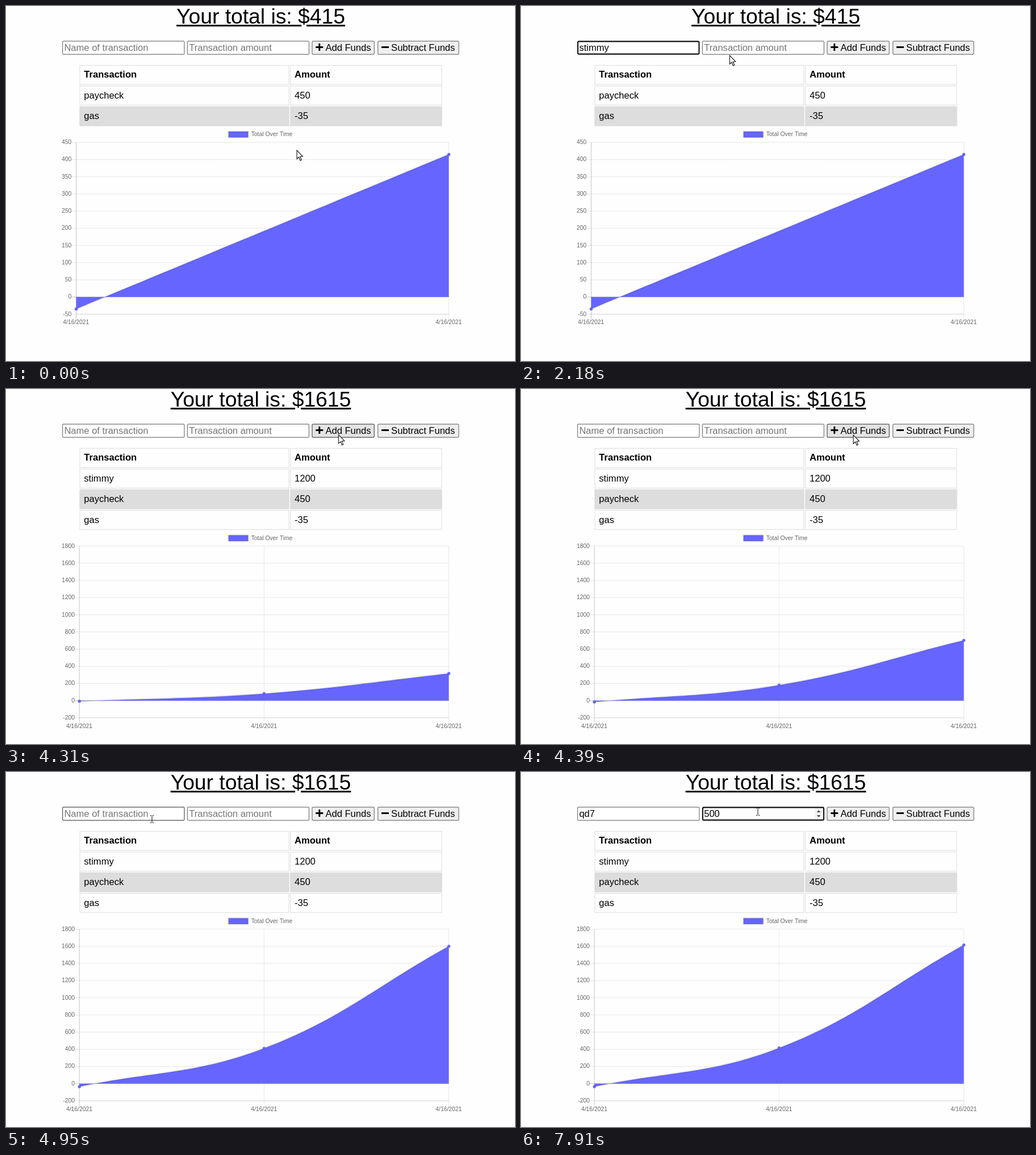
An HTML page with a canvas that plays this animation: 896x625 px, repeating every 8000 ms.

```html
<!DOCTYPE html>
<html lang="en">
<head>
<meta charset="utf-8">
<title>Budget tracker</title>
<style>
  html, body { margin: 0; width: 100%; height: 100%; overflow: hidden; background: #fefefe; }
  canvas { position: absolute; left: 0; top: 0; }
  h1 {
    position: absolute; left: 0; top: -3px; width: 897px; margin: 0;
    font: 37.26px/42px "Liberation Sans", Arial, sans-serif;
    text-align: center; text-decoration: underline; white-space: nowrap; color: #000;
  }
</style>
</head>
<body>
<h1 id="total">Your total is: $415</h1>
<canvas id="stage" width="896" height="625"></canvas>
<script>
const LOOP = 8000;
const ADDED = 4240, GROW_START = 4258, GROW = 1000;
const FAMILY = '"Liberation Sans", Arial, sans-serif';
const BODY = '16.56px ' + FAMILY;
const SMALL = '10.35px ' + FAMILY;
const BLUE = '#6666ff';
const ctx = document.getElementById('stage').getContext('2d');
const title = document.getElementById('total');

const NAME = { x: 99, w: 215.5, hint: 'Name of transaction' };
const AMOUNT = { x: 318.8, w: 215.2, hint: 'Transaction amount', number: true };
const ADD = { x: 538.3, w: 110.5, label: 'Add Funds', plus: true };
const SUBTRACT = { x: 654, w: 143.6, label: 'Subtract Funds' };

// Which field has the focus from each time on
const focusSteps = [[0, null], [920, NAME], [2390, AMOUNT], [ADDED, null], [5330, NAME], [6900, AMOUNT]];
// Times at which the text caret turns on, off, on ...
const caretFlips = [950, 1180, 1240, 1940, 2190, 2640, 2860, 3320, 3570, 3820, 4070, ADDED,
  5340, 5600, 5830, 6410, 6610, 7150, 7390, 7910];
const entries = [
  { field: NAME, text: 'stimmy', from: 1240, to: 1690, clear: ADDED },
  { field: AMOUNT, text: '1200', from: 2860, to: 3070, clear: ADDED },
  { field: NAME, text: 'qd7', from: 6090, to: 6170, clear: LOOP },
  { field: AMOUNT, text: '500', from: 7450, to: 7630, clear: LOOP }
];
// Pointer path: time, x, y
const path = [
  [0, 512, 254], [100, 512, 254], [400, 390, 150], [640, 285, 50], [710, 262, 44], [820, 240, 64],
  [1940, 240, 64], [2180, 367, 87], [2380, 400, 74], [2500, 405, 73],
  [3320, 405, 73], [3580, 545, 22], [3800, 606, 60], [3960, 602, 71], [4120, 592, 75],
  [4200, 592, 75], [4330, 585, 81], [4430, 585, 81], [4700, 400, 92], [4950, 257, 83],
  [5050, 257, 83], [5140, 246, 76], [6410, 246, 76], [6620, 453, 73], [6800, 440, 72],
  [6980, 417, 70], [LOOP, 417, 70]
];

function slope(i, k) {
  const a = path[i - 1], b = path[i], c = path[i + 1];
  if (!a || !c) return 0;
  const before = b[k] - a[k], after = c[k] - b[k];
  return before * after <= 0 ? 0 : (before + after) / (c[0] - a[0]);
}

function pointerAt(t) {
  let i = 0;
  while (i < path.length - 2 && path[i + 1][0] <= t) i++;
  const a = path[i], b = path[i + 1], d = b[0] - a[0], u = (t - a[0]) / d;
  const still = a[1] === b[1] && a[2] === b[2];
  const axis = k => {
    if (still) return a[k];
    const s = u * u * (3 - 2 * u);
    return a[k] + (b[k] - a[k]) * s +
      d * (slope(i, k) * u * (1 - u) * (1 - u) - slope(i + 1, k) * u * u * (1 - u));
  };
  return { x: axis(1), y: axis(2) };
}

function write(str, x, y, color = '#000', font = BODY, align = 'left') {
  ctx.font = font;
  ctx.fillStyle = color;
  ctx.textAlign = align;
  ctx.fillText(str, x, y);
}

function line(x1, y1, x2, y2, color, width = 0.9) {
  ctx.strokeStyle = color;
  ctx.lineWidth = width;
  ctx.beginPath();
  ctx.moveTo(x1, y1);
  ctx.lineTo(x2, y2);
  ctx.stroke();
}

function polygon(points, color) {
  ctx.fillStyle = color;
  ctx.beginPath();
  points.forEach(p => ctx.lineTo(p[0], p[1]));
  ctx.closePath();
  ctx.fill();
}

function frame(box, fill, border, width, radius) {
  const h = width / 2;
  ctx.beginPath();
  ctx.roundRect(box.x + h, 61.3 + h, box.w - width, 24.4 - width, radius);
  ctx.fillStyle = fill;
  ctx.fill();
  ctx.strokeStyle = border;
  ctx.lineWidth = width;
  ctx.stroke();
}

const over = (box, p) => p.x >= box.x && p.x <= box.x + box.w && p.y >= 61 && p.y <= 86;

function typed(field, t) {
  const e = entries.find(e => e.field === field && t >= e.from && t < e.clear);
  if (!e) return '';
  const step = (e.to - e.from) / (e.text.length - 1);
  return e.text.slice(0, Math.floor((t - e.from) / step + 1.001));
}

function drawField(field, t, pointer) {
  const focused = focusSteps.filter(s => s[0] <= t).pop()[1] === field;
  const hover = over(field, pointer);
  if (focused) frame(field, '#fff', '#101010', 2.1, 2);
  else frame(field, '#fff', hover ? '#4f4f4f' : '#767676', 1.2, 1.5);

  const text = typed(field, t), x = field.x + 3.4;
  if (text) write(text, x, 79);
  else write(field.hint, x, 79, '#757575');

  if (focused && caretFlips.filter(f => f <= t).length % 2) {
    ctx.font = BODY;
    const cx = Math.round(x + (text ? ctx.measureText(text).width : 0));
    ctx.fillStyle = '#000';
    ctx.fillRect(cx, 65, 1, 17.5);
  }
  if (field.number && (focused || hover)) {
    ctx.fillStyle = '#f1f1f1';
    ctx.fillRect(517.5, 64, 13, 19);
    polygon([[520.8, 71], [524, 67.3], [527.2, 71]], '#484848');
    polygon([[520.8, 76], [524, 79.7], [527.2, 76]], '#484848');
  }
}

function drawButton(b, pointer) {
  const hover = over(b, pointer);
  frame(b, hover ? '#e4e4e4' : '#efefef', hover ? '#4f4f4f' : '#767676', 1.2, 2);
  const x = b.x + 6.8;
  ctx.fillStyle = '#000';
  ctx.beginPath();
  ctx.roundRect(x, 71.1, 13.2, 2.9, 0.8);
  if (b.plus) ctx.roundRect(x + 5.2, 66, 2.9, 13.1, 0.8);
  ctx.fill();
  write(b.label, b.x + 24.1, 79);
}

function drawTable(rows) {
  rows.forEach((row, i) => {
    const y = 104 + i * 36.4;
    [[129.5, 369], [500.2, 267.3]].forEach(([x, w], k) => {
      if (i && i % 2 === 0) {
        ctx.fillStyle = '#dddddd';
        ctx.fillRect(x, y, w, 34.6);
      }
      ctx.strokeStyle = '#dddddd';
      ctx.lineWidth = 1;
      ctx.strokeRect(x + 0.5, y + 0.5, w - 1, 33.6);
      write(row[k], x + 7.8, Math.round(y + 22.4), '#000', i ? BODY : 'bold ' + BODY);
    });
  });
}

function drawChart(c, grow) {
  const right = 779.5, gap = 30.23, ticks = 10, bottom = c.top + ticks * gap;
  const yOf = v => c.top + (c.max - v) / c.step * gap;
  const zero = yOf(0), last = c.values.length - 1;
  const xOf = i => c.left + (right - c.left) * i / last;
  const faint = 'rgba(0,0,0,0.1)', strong = 'rgba(0,0,0,0.25)';

  // Legend
  const ly = c.top - 19.2;
  ctx.fillStyle = BLUE;
  ctx.fillRect(391.7, ly, 34.6, 10.4);
  ctx.strokeStyle = faint;
  ctx.lineWidth = 2.6;
  ctx.strokeRect(391.7, ly, 34.6, 10.4);
  write('Total Over Time', 431.7, c.top - 11, '#666', SMALL);

  // Grid and labels
  for (let i = 0; i <= last; i++) {
    const x = xOf(i);
    line(x, c.top, x, bottom + 8.6, i ? faint : strong);
    write('4/16/2021', x - 0.2, bottom + 17.6, '#666', SMALL, 'center');
  }
  for (let i = 0; i <= ticks; i++) {
    const y = c.top + i * gap, v = c.max - i * c.step;
    line(c.left - 8.6, y, right, y, v ? faint : strong);
    write(String(v), c.left - 8.2, y + 3, '#666', SMALL, 'right');
  }
  line(c.left, bottom, right, bottom, faint);

  // Smoothed area, scaled about the zero line
  const pts = c.values.map((v, i) => [xOf(i), yOf(v)]);
  const handles = pts.map((p, i) => {
    const a = pts[i - 1] || p, b = pts[i + 1] || p;
    const da = Math.hypot(p[0] - a[0], p[1] - a[1]), db = Math.hypot(b[0] - p[0], b[1] - p[1]);
    const at = f => [p[0] + f * (b[0] - a[0]), p[1] + f * (b[1] - a[1])];
    return { into: at(-0.4 * da / (da + db)), out: at(0.4 * db / (da + db)) };
  });
  const scale = p => [p[0], zero + (p[1] - zero) * grow];
  const curve = () => {
    ctx.lineTo(...scale(pts[0]));
    for (let i = 1; i <= last; i++) {
      ctx.bezierCurveTo(...scale(handles[i - 1].out), ...scale(handles[i].into), ...scale(pts[i]));
    }
  };
  ctx.beginPath();
  ctx.moveTo(c.left, zero);
  curve();
  ctx.lineTo(right, zero);
  ctx.closePath();
  ctx.fillStyle = BLUE;
  ctx.fill();
  ctx.beginPath();
  curve();
  ctx.strokeStyle = faint;
  ctx.lineWidth = 2.6;
  ctx.stroke();
  pts.map(scale).forEach(p => {
    ctx.beginPath();
    ctx.arc(p[0], p[1], 2.6, 0, 7);
    ctx.fillStyle = BLUE;
    ctx.fill();
    ctx.lineWidth = 0.9;
    ctx.stroke();
  });
}

function drawPointer(p) {
  ctx.save();
  ctx.translate(p.x, p.y);
  if (over(NAME, p) || over(AMOUNT, p)) {
    const ink = '#222';
    line(0, -5.5, 0, 5.5, ink, 1.1);
    for (const y of [-6.3, 6.3]) {
      line(-3.3, y, -0.7, y, ink, 1.1);
      line(0.7, y, 3.3, y, ink, 1.1);
    }
  } else {
    polygon([[0, 0], [0, 15.2], [3.5, 12], [6, 18], [8.3, 17], [5.8, 11.2], [10.4, 10.8]], '#fff');
    ctx.strokeStyle = '#111';
    ctx.lineWidth = 1.1;
    ctx.stroke();
  }
  ctx.restore();
}

const HEAD = ['Transaction', 'Amount'];
const OLD_ROWS = [['paycheck', '450'], ['gas', '-35']];
const before = {
  total: 415, rows: [HEAD, ...OLD_ROWS],
  chart: { top: 240.2, left: 123.5, max: 450, step: 50, values: [-35, 415] }
};
const after = {
  total: 1615, rows: [HEAD, ['stimmy', '1200'], ...OLD_ROWS],
  chart: { top: 276.6, left: 129.2, max: 1800, step: 200, values: [-35, 415, 1615] }
};

function draw(t) {
  const state = t < ADDED ? before : after;
  const u = Math.min(1, Math.max(0, (t - GROW_START) / GROW));
  const grow = t < ADDED ? 1 : 1 - Math.pow(1 - u, 4);
  const pointer = pointerAt(t);
  const heading = 'Your total is: $' + state.total;
  if (title.textContent !== heading) title.textContent = heading;

  ctx.clearRect(0, 0, 896, 625);
  drawField(NAME, t, pointer);
  drawField(AMOUNT, t, pointer);
  drawButton(ADD, pointer);
  drawButton(SUBTRACT, pointer);
  drawTable(state.rows);
  drawChart(state.chart, grow);
  drawPointer(pointer);
}

const start = performance.now();
function tick() {
  draw((performance.now() - start) % LOOP);
  requestAnimationFrame(tick);
}
tick();
</script>
</body>
</html>
```
